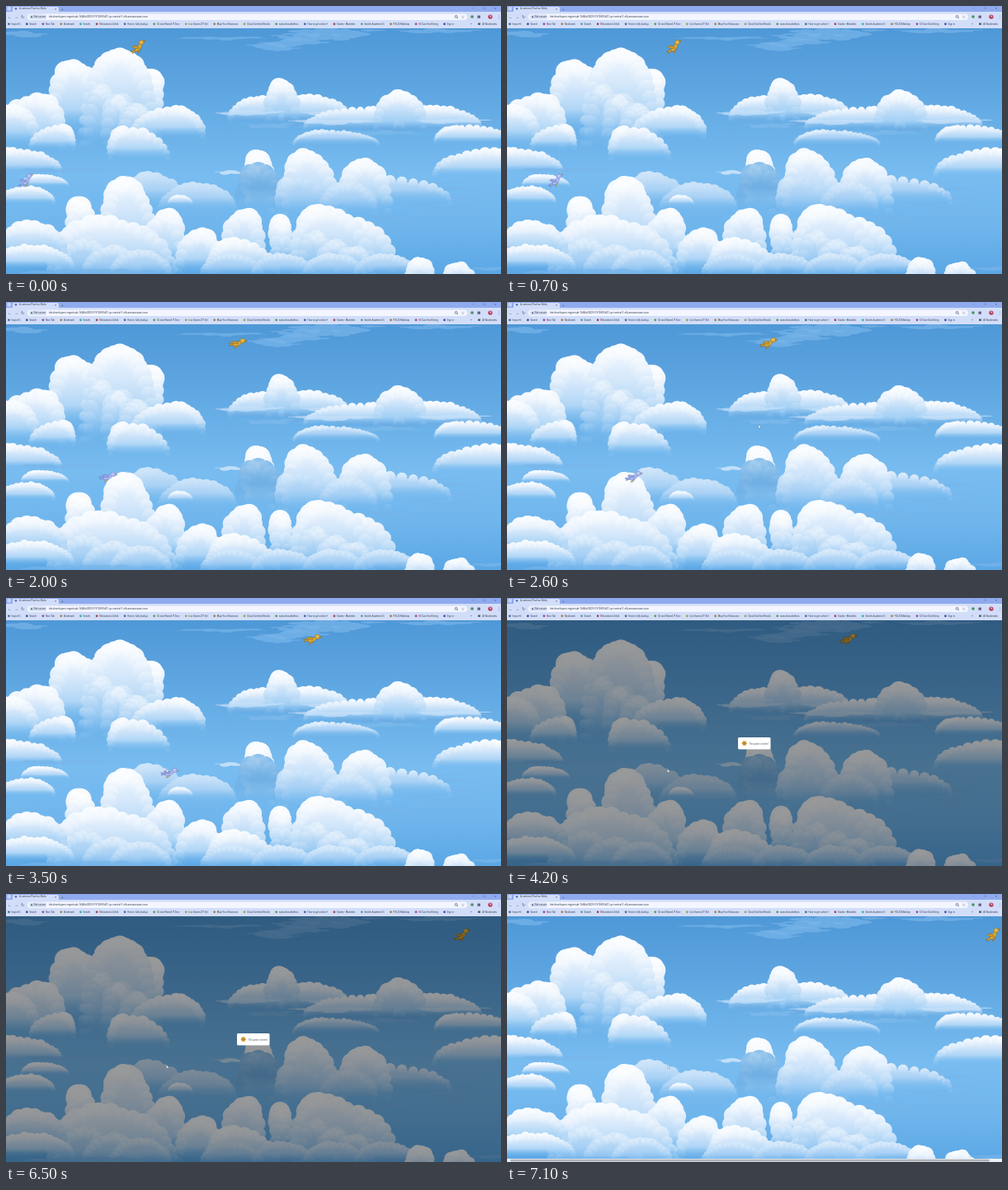
An HTML page with a canvas for the animation above (7200 ms loop, 600 px wide and 325 px high).

```html
<!DOCTYPE html>
<html>
<head>
<meta charset="utf-8">
<style>
html, body { margin: 0; width: 100%; height: 100%; overflow: hidden; }
canvas { display: block; }
</style>
</head>
<body>
<canvas id="stage" width="600" height="325"></canvas>
<script>
const LOOP = 7200, STEP = 100;
const DIALOG_FROM = 3700, DIALOG_TO = 6900, CURSOR_FROM = 2500, SCROLL_FROM = 7000;
const stage = document.getElementById('stage').getContext('2d');
const backdrop = document.createElement('canvas');
backdrop.width = 600;
backdrop.height = 325;
let c = backdrop.getContext('2d');

let seed = 7;
const random = () => (seed = seed * 16807 % 2147483647) / 2147483647;
const clamp = (v, low, high) => Math.max(low, Math.min(high, v));

function vertical(top, bottom, ...colors) {
  const g = c.createLinearGradient(0, top, 0, bottom);
  colors.forEach((color, i) => g.addColorStop(i / (colors.length - 1), color));
  return g;
}
function box(x, y, w, h, color, radius = 0) {
  c.fillStyle = color;
  c.beginPath();
  c.roundRect(x, y, w, h, radius);
  c.fill();
}
function dot(x, y, r, color) {
  c.fillStyle = color;
  c.beginPath();
  c.arc(x, y, r, 0, 7);
  c.fill();
}
function label(text, x, y, size = 3.2, color = '#39404f') {
  c.font = size + 'px Roboto, sans-serif';
  c.fillStyle = color;
  c.fillText(text, x, y);
  return c.measureText(text).width;
}

const WHITE = ['#f4faff', '#d8e9fb', '#b0d6f6', 'rgba(115,184,239,0)'];
const SOFT = ['#c9e2f9', '#a9d1f5', 'rgba(112,181,237,0)'];
const SHADE = ['#84bcea', '#6eafe4', 'rgba(105,175,230,0)'];
const HAZE = 'rgba(120,182,234,.7)';

// Puffs along a half-ellipse rim; the body under them fades out at the base.
function mound(left, right, peak, top, base, tones = WHITE, gloss = .5) {
  const h = base - top, size = clamp(h * .2, 2.5, 11);
  const n = Math.ceil(Math.PI * Math.hypot((right - left) / 2, h) / 1.414 / size / 1.2);
  const puffs = [];
  for (let i = 0; i <= n; i++) {
    const a = Math.PI * i / n, rise = Math.sin(a);
    const reach = a < Math.PI / 2 ? peak - left : right - peak;
    puffs.push({
      x: peak - Math.cos(a) * (reach - size),
      y: base - rise * (h - size),
      r: size * (.45 + .55 * rise) * (.85 + .4 * random()),
      rise
    });
  }
  c.beginPath();
  puffs.forEach(p => c.lineTo(p.x, p.y));
  c.closePath();
  for (const { x, y, r } of puffs) {
    c.moveTo(x + r, y);
    c.arc(x, y, r, 0, 2 * Math.PI);
  }
  c.fillStyle = vertical(top, base, ...tones);
  c.fill();
  for (const { x, y, r, rise } of puffs) {
    const shine = gloss * (.2 + .8 * rise);
    dot(x, y, r, vertical(y - r, y + r * .7, `rgba(255,255,255,${shine})`, 'rgba(255,255,255,0)'));
  }
}

// A mound with softer lobes billowing in front of it.
function heap(left, right, peak, top, base) {
  mound(left, right, peak, top, base);
  const w = right - left, h = base - top;
  for (let k = 0; k < 3; k++) {
    const x = left + w * (.06 + .2 * k), y = top + h * (.3 + .1 * k + .08 * random());
    mound(x, x + w * .48, x + w * .25, y, base, SOFT, .35);
  }
}

// A streak of overlapping flat ellipses, thin at both ends.
function drift(x, y, w, h, color) {
  const n = Math.max(4, Math.round(w / 10));
  c.fillStyle = color;
  c.beginPath();
  for (let i = 0; i <= n; i++) {
    const u = i / n, px = x + u * w, py = y + (random() - .5) * h * .5;
    const rx = w / n * (.9 + random() * .5);
    const ry = h * .5 * Math.sin(Math.PI * (.06 + .88 * u)) * (.6 + .5 * random());
    c.moveTo(px + rx, py);
    c.ellipse(px, py, rx, ry, 0, 0, 2 * Math.PI);
  }
  c.fill();
}

// A long flat cloud: shaded streak, side mounds, tall middle, light streaks.
function deck(left, right, peak, top, base) {
  const w = right - left, h = base - top;
  drift(left, base - h * .12, w, h * .3, 'rgba(108,172,227,.9)');
  mound(left + w * .02, peak + w * .05, peak - w * .15, top + h * .4, base);
  mound(peak - w * .04, right - w * .03, peak + w * .18, top + h * .38, base);
  mound(peak - w * .15, peak + w * .17, peak, top, base);
  drift(left, base - h * .2, w * .4, h * .14, 'rgba(200,226,249,.7)');
  drift(right - w * .35, base - h * .2, w * .3, h * .14, 'rgba(200,226,249,.7)');
  drift(left + w * .2, base + h * .12, w * .4, h * .12, 'rgba(125,186,235,.8)');
}

function paintSky() {
  box(0, 27, 600, 298, vertical(27, 325, '#4f98d7', '#5ba3df', '#69b0e8', '#78bcf0', '#70b6ed', '#5ba7e5'));

  // high haze and scattered thin streaks
  for (let i = 0; i < 4; i++) drift(302 + i * 14, 50 - i * 6, 45 + i * 20, 10, HAZE);
  drift(216, 39, 92, 4, HAZE);
  drift(480, 30, 85, 5, HAZE);
  drift(0, 34, 42, 8, HAZE);
  for (let i = 0; i < 8; i++) drift(420 + 110 * random(), 215 + i * 6, 30 + 50 * random(), 3, HAZE);

  // upper left
  mound(45, 130, 78, 66, 155);
  mound(140, 197, 176, 78, 160);
  heap(82, 190, 138, 52, 168);
  mound(-28, 78, 44, 106, 172);
  mound(-25, 45, 8, 120, 166);
  mound(145, 246, 206, 121, 160);
  mound(24, 88, 68, 143, 174);
  mound(118, 204, 142, 145, 186);

  // upper right
  deck(262, 428, 333, 88, 139);
  deck(352, 588, 475, 103, 149);
  mound(345, 455, 385, 150, 169, SOFT);
  mound(516, 625, 548, 144, 166);
  mound(512, 640, 592, 172, 207);

  // middle left
  mound(-40, 72, 8, 172, 203);
  drift(10, 199, 115, 5, HAZE);
  mound(16, 78, 40, 204, 219);
  mound(-14, 62, 28, 218, 240);

  // middle
  mound(138, 225, 172, 202, 244, SOFT, .1);
  mound(180, 284, 230, 214, 250, SOFT, .1);
  mound(194, 228, 210, 229, 241);
  drift(259, 202, 27, 5, 'rgba(206,230,250,.85)');
  mound(440, 545, 458, 205, 240, SOFT);
  mound(398, 474, 432, 184, 250);
  mound(283, 333, 303, 176, 250);
  mound(274, 345, 302, 190, 252, SHADE, .12);
  mound(328, 410, 360, 173, 254);
  mound(322, 402, 346, 204, 253, SOFT, .2);
  mound(375, 455, 415, 212, 252, SOFT, .25);

  // lower left
  mound(106, 192, 142, 208, 315);
  mound(158, 222, 198, 245, 318);
  mound(66, 118, 88, 233, 316);
  heap(42, 215, 112, 254, 330);
  for (const rise of [0, 28]) mound(-25, 80 + rise / 4, 30, 261 + rise, 305 + rise / 2);

  // lower middle
  mound(252, 320, 291, 244, 318);
  mound(316, 352, 333, 253, 314);
  mound(390, 480, 415, 254, 322);
  heap(338, 456, 379, 242, 328);
  mound(198, 268, 238, 270, 324);
  mound(238, 338, 270, 282, 326);
  for (let x = 232; x < 430; x += 62) mound(x, x + 84, x + 38, 300, 328, SOFT, .3);
  drift(30, 322, 150, 6, HAZE);
  mound(478, 526, 501, 305, 345);
  mound(525, 576, 546, 310, 345);
  drift(568, 318, 35, 5, HAZE);
}

const MARKS = ['Import G', 'Search', 'New Tab', 'Bookmark', 'Search', 'Relocations Unlink', 'How to fully backup',
  'CU and Shared IT Serv', 'Live Games XT Set', 'Map Your Showcase', 'Cloud Certified Details', 'www.shroudedless',
  'How to get a short f', 'Guides - Mandolin', 'Switch Academic G', 'FIG 43 Mailstop', '60 Core Draft Integ', 'Sign in'];

function paintBrowser() {
  box(0, 0, 600, 9, '#8faaee');
  box(0, 7, 600, 20, '#d2def9');
  box(8, 1, 56, 8, '#d2def9', 2);
  box(1.5, 1, 4.5, 4.5, '#c3d2f7', 1.2);
  dot(12, 3.2, 1.3, '#566fae');
  label('A cartoon Pixel on Birds', 16, 4.4, 3.1);
  label('×', 59, 4.5, 4);
  label('+', 67, 4.6, 4);
  ['–', '□', '×'].forEach((sign, i) => label(sign, 565 + i * 13.5, 4.4, 4));
  ['←', '→', '↻'].forEach((sign, i) => label(sign, 2 + i * 8, 14.8, 5));
  box(26, 9.5, 533, 7.5, '#f3f6fe', 3.7);
  box(28, 10.3, 21, 5.8, '#d6dff4', 2.9);
  dot(31, 13.2, 1, '#566075');
  label('Not secure', 33.5, 14.3, 3);
  label('tds-developers-mgmtsub-1684x52029-1970f99d21.cp-central-1.elb.amazonaws.com', 52, 14.3, 3.2);
  c.strokeStyle = '#4a5265';
  c.lineWidth = .7;
  c.beginPath();
  c.arc(545.6, 12.8, 1.4, 0, 7);
  c.moveTo(546.7, 13.9);
  c.lineTo(548, 15.2);
  c.stroke();
  label('☆', 551.5, 14.8, 5);
  dot(565, 13, 1.8, '#4e8f5b');
  box(571.5, 11.4, 3.4, 3.4, '#59647c', .6);
  dot(587, 13, 2.6, '#b52d4d');
  label('M', 585.9, 14.1, 2.8, '#fff');
  label('⋮', 595, 14.8, 5);

  let x = 2;
  MARKS.forEach((text, i) => {
    dot(x + 1.4, 21.8, 1.4, `hsl(${215 + i * i * 20},45%,45%)`);
    x += 11 + label(text, x + 4.5, 22.8, 2.8);
  });
  label('»', 563, 23.2, 4);
  box(572, 20.4, 3, 2.6, '#59647c', .4);
  label('All Bookmarks', 577, 22.8, 2.8);
}

function bird(x, y, t, body, wing, beak, line) {
  const beat = Math.cos((t / STEP % 8 - 3.5) * Math.PI / 4);
  const lift = .3 - .5 * beat;
  const fill = color => {
    c.fillStyle = color;
    c.fill();
    c.stroke();
  };
  const blob = (bx, by, rx, ry, turn, color) => {
    c.beginPath();
    c.ellipse(bx, by, rx, ry, turn, 0, 7);
    fill(color);
  };
  const shape = (color, ...p) => {
    c.beginPath();
    for (let i = 0; i < p.length; i += 2) c.lineTo(p[i], p[i + 1]);
    c.closePath();
    fill(color);
  };
  c.save();
  c.translate(x, y);
  c.rotate(-.32 + .3 * beat);
  c.strokeStyle = line;
  c.lineWidth = .45;
  shape(wing, -4, 1, -11, .5, -9, 2, -10.5, 3.5, -4, 3);
  shape(beak, -1, 3.5, -5, 6.5, -2.5, 6.8, 1, 4);
  blob(-.5, 1.6, 5.2, 2.4, -.25, body);
  shape(beak, 8.5, -2.5, 11.5, -.9, 8, .2);
  blob(6, -1.7, 3.1, 2.7, 0, body);
  blob(-2.8, -lift, 4.2, 1.5, .3 + lift * .6, wing);
  dot(7, -2.5, .8, '#fff');
  dot(7.3, -2.4, .4, '#222');
  c.restore();
}

function cursor(t) {
  const u = clamp((t - 2600) / 800, 0, 1);
  c.save();
  c.translate(305 - 110.5 * u, 149 + 58.5 * u);
  c.beginPath();
  for (const [x, y] of [[0, 0], [0, 4.2], [1.2, 3.3], [2.2, 5], [1.8, 3], [3, 3]]) c.lineTo(x, y);
  c.closePath();
  c.fillStyle = '#fff';
  c.fill();
  c.strokeStyle = '#56606c';
  c.lineWidth = .3;
  c.stroke();
  c.restore();
}

function dialog() {
  box(0, 27, 600, 298, 'rgba(0,0,0,.4)');
  box(280, 169, 39.5, 14.5, '#fff', 1.6);
  for (let a = 0; a < 6; a++) dot(287.7 + 1.9 * Math.cos(a * 1.047), 176.2 + 1.9 * Math.sin(a * 1.047), 1.2, '#d6a540');
  dot(287.7, 176.2, 1.8, '#b98a35');
  label('The quest is started', 293.5, 178, 2.6, '#4b5563');
}

function scrollbar() {
  box(0, 321, 600, 4, '#edf0f4');
  box(4, 321.8, 581, 2.6, '#adb1b6', 1.3);
}

function draw() {
  const t = Math.floor(performance.now() % LOOP / STEP) * STEP;
  c.drawImage(backdrop, 0, 0);
  bird(160 + t * .0604, 49, t, '#dfb03a', '#cf9d2c', '#e08f35', '#7d601f');
  if (t < DIALOG_FROM) bird(24 + t * .0498, 211, t, '#b0bff4', '#94a6e6', '#c5bd60', '#6673b8');
  if (t >= DIALOG_FROM && t < DIALOG_TO) dialog();
  if (t >= CURSOR_FROM) cursor(t);
  if (t >= SCROLL_FROM) scrollbar();
  requestAnimationFrame(draw);
}

paintSky();
paintBrowser();
c = stage;
draw();
</script>
</body>
</html>
```
